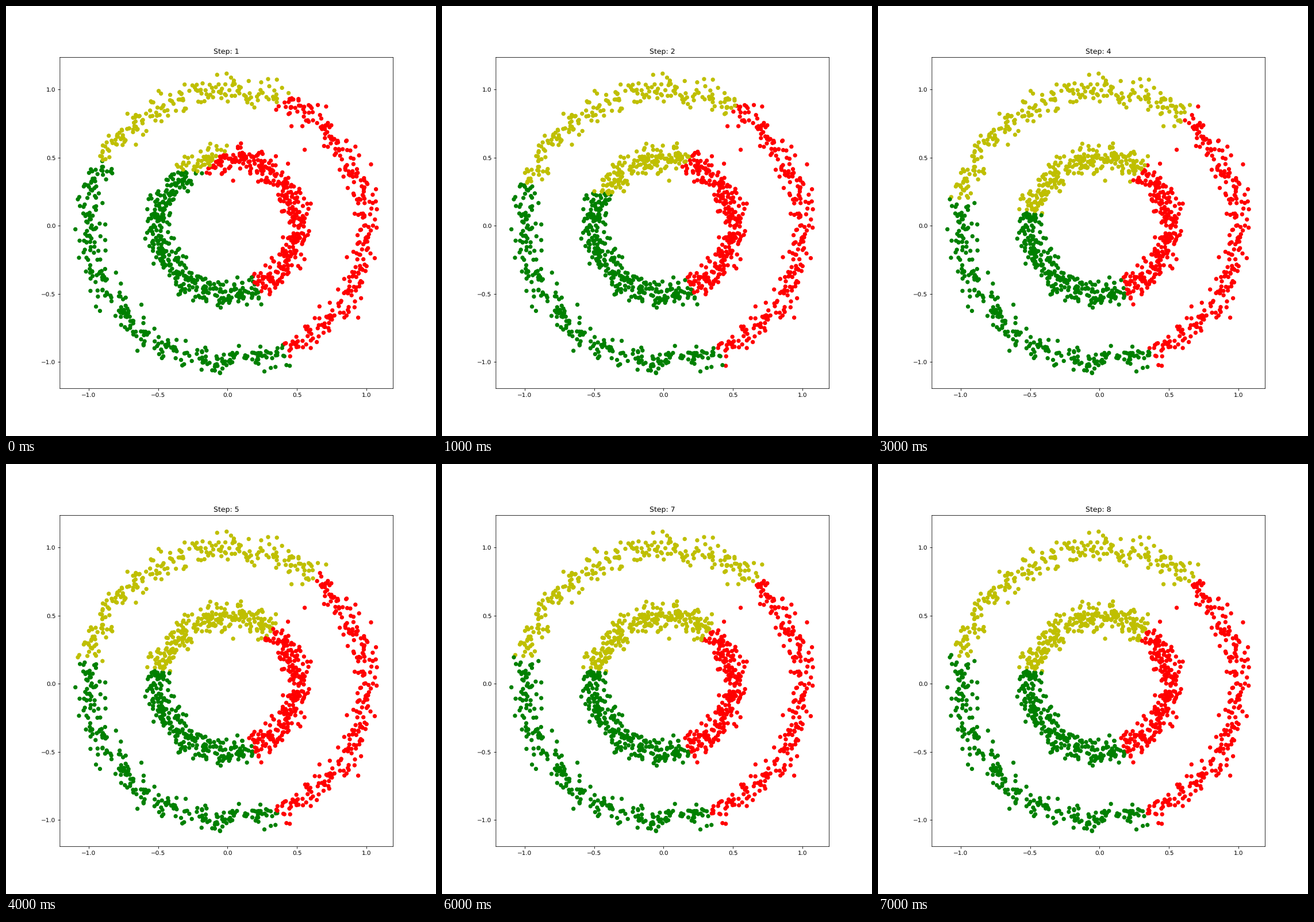
Recreate the animation shown at these times as a matplotlib script. Size 748 by 748 pixels, loop 8000 ms.

```python
import matplotlib.pyplot as plt
import numpy as np
from matplotlib.animation import FuncAnimation

SIZE = 748
STEPS = 8
COLORS = np.array(["r", "y", "g"])
START = np.array([(0.300, 0.253), (-0.281, 0.885), (-0.386, -0.061)])
STRAYS = [(0.555, 0.557), (0.04, 0.33), (0.435, 0.455),
          (0.46, 0.73), (-0.62, -0.58), (0.94, -0.675)]

plt.rcParams.update({"path.snap": False, "text.hinting": "none"})


def make_rings(n=750, inner=0.5, noise=0.05, limit=0.13):
    """Two noisy concentric rings, with the far strays set by hand."""
    rng = np.random.RandomState(0)
    angle = np.tile(np.linspace(0, 2 * np.pi, n, endpoint=False), 2)
    radius = np.repeat([1.0, inner], n)
    order = rng.permutation(2 * n)
    angle, radius = angle[order], radius[order]
    ring = radius[:, None] * np.column_stack([np.cos(angle), np.sin(angle)])
    pts = ring + rng.normal(scale=noise, size=ring.shape)
    near = np.abs(np.hypot(*pts.T) - radius) < limit
    return np.vstack([pts[near], STRAYS])


def k_means(pts, centers, steps):
    """Cluster labels of every point after each step."""
    history = []
    for _ in range(steps):
        dist = np.linalg.norm(pts[:, None] - centers, axis=2)
        labels = dist.argmin(axis=1)
        history.append(labels)
        centers = np.array([pts[labels == k].mean(axis=0)
                            for k in range(len(centers))])
    return history


points = make_rings()
history = k_means(points, START, STEPS)

fig = plt.figure(figsize=(10, 10), dpi=SIZE / 10)
ax = fig.add_axes((0.1255, 0.1105, 0.775, 0.77))
ax.set_xlim(-1.206, 1.192)
ax.set_ylim(-1.195, 1.235)
ax.set_xticks(np.arange(-1, 1.1, 0.5))
ax.set_yticks(np.arange(-1, 1.1, 0.5))
dots = ax.scatter(*points.T)
title = ax.set_title("")


def update(step):
    dots.set_color(COLORS[history[step]])
    title.set_text(f"Step: {step + 1}")
    return dots, title


anim = FuncAnimation(fig, update, frames=STEPS, interval=1000,
                     init_func=lambda: update(0), repeat=True, repeat_delay=0)
plt.show()
```
